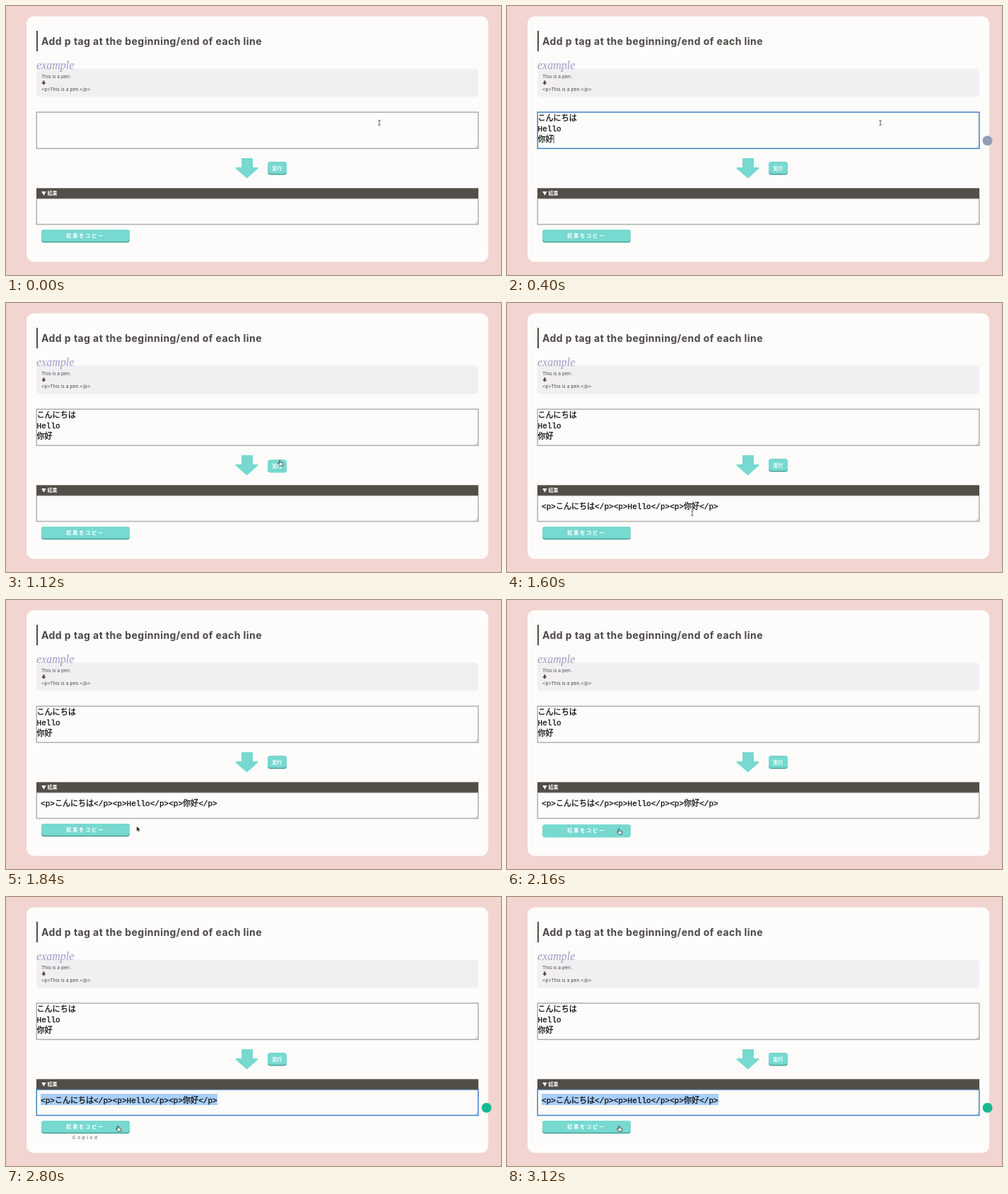
An HTML page for the animation above (3200 ms loop, 700 by 380 pixels).

```html
<!DOCTYPE html>
<html lang="en">
<head>
<meta charset="utf-8">
<title>Tag tool demo</title>
<style>
  html, body { margin: 0; width: 100%; height: 100%; overflow: hidden; background: #f2d4d0; }
  svg { display: block; width: 700px; height: 380px; }
  text { white-space: pre; }
  .ui { font-family: Inter, "Noto Sans CJK JP", "Noto Sans CJK", sans-serif; fill: #4b4845; }
  .title { font-size: 14px; font-weight: 700; letter-spacing: .44px; }
  .small { font-size: 6.7px; }
  .script { font: italic 16px "Liberation Serif", serif; fill: #a297c6; }
  .label { font: 900 7px "Noto Sans CJK JP", "Noto Sans CJK", sans-serif; fill: #fff; }
  .wide { letter-spacing: 2px; }
  .copied { font-size: 6.3px; font-weight: 700; letter-spacing: 2.6px; fill: #68645f; }
  .code { font: 11.05px "Liberation Mono", "Noto Sans CJK JP", "Noto Sans CJK", monospace;
          fill: #111; stroke: #111; stroke-width: .3px; }
  .teal { fill: #77d9d0; }
  .dark { fill: #524e48; }
  .field { fill: none; stroke-width: 1.5px; }
  .grip { fill: none; stroke: #999; stroke-width: .6px; }
</style>
</head>
<body>
<svg viewBox="0 0 700 380">
  <rect width="700" height="380" fill="#f2d4d0"/>
  <rect x="29" y="14.5" width="653" height="347" rx="10" fill="#fdfcfa"/>

  <rect class="dark" x="43" y="35" width="2" height="29"/>
  <text class="ui title" x="50" y="54.5">Add p tag at the beginning/end of each line</text>

  <rect x="43" y="88.5" width="625" height="40" rx="5" fill="#f1eff2"/>
  <text class="script" x="43" y="89">example</text>
  <text class="ui small" x="50" y="101.7">This is a pen.</text>
  <path class="dark" d="M52 105.5h2.6v2.7h2l-3.3 3.3-3.3-3.3h2z"/>
  <text class="ui small" x="50" y="119.8">&lt;p&gt;This is a pen.&lt;/p&gt;</text>

  <rect id="input" class="field" x="43.25" y="150" width="624.5" height="51.3"/>
  <path class="grip" d="M663 201l4-4M665.3 201l1.7-1.7"/>
  <g id="typed" class="code">
    <text x="43.5" y="162.3">こんにちは</text>
    <text x="43.5" y="177">Hello</text>
    <text x="43.5" y="191.7">你好</text>
  </g>
  <rect id="caret" width=".8" height="12" fill="#222"/>

  <path class="teal" d="M334 216h14v13h7.5L340.700 242.300 325.500 229h8.500z"
        stroke="#77d9d0" stroke-width="2" stroke-linejoin="round"/>

  <g id="run">
    <rect class="base" x="370" y="220.3" width="27" height="18.2" rx="4"/>
    <rect class="teal" x="370" y="220.3" width="27" height="16.8" rx="4"/>
    <text class="label" x="376.2" y="231.5">実行</text>
  </g>

  <rect id="selection" x="49" y="278" width="250" height="16" fill="#a9cff8"/>
  <text id="result" class="code" x="49" y="290.6">&lt;p&gt;こんにちは&lt;/p&gt;&lt;p&gt;Hello&lt;/p&gt;&lt;p&gt;你好&lt;/p&gt;</text>
  <rect id="output" class="field" x="43.25" y="272" width="624.5" height="36.5"/>
  <path class="grip" d="M663 308l4-4M665.3 308l1.7-1.7"/>
  <rect class="dark" x="43" y="257.3" width="625" height="14.5"/>
  <path fill="#fff" d="M50.3 262h6.3l-3.15 5.8z"/>
  <text class="label" x="58.5" y="267.4">結果</text>

  <text id="copied" class="ui copied" x="94">Copied</text>
  <g id="copy">
    <rect class="base" x="50" y="316" width="125" height="18.2" rx="4"/>
    <rect class="teal" x="50" y="316" width="125" height="16.8" rx="4"/>
    <text class="label wide" x="85.3" y="327.2">結果をコピー</text>
  </g>

  <circle id="badge" cx="679.5" r="7"/>

  <g id="cursor">
    <path id="ibeam" fill="none" stroke="#333" stroke-width=".8"
          d="M-1.7-3.5Q0-3.500 0-2.2Q0-3.500 1.7-3.500M0-2.2V2.2M-1.7 3.500Q0 3.500 0 2.2Q0 3.500 1.7 3.500"/>
    <path id="hand" fill="#fff" stroke="#222" stroke-width=".8" stroke-linejoin="round"
          d="M-1.5-3.5q.8-.9 1.5 0v2.6l3 .6q1 .3 .9 1.3l-.6 3H-.8L-3.3 1q-.2-1 .8-.7l1 .7z"/>
    <path id="arrow" fill="#111" stroke="#fff" stroke-width=".6"
          d="M0 0v7.5l1.8-1.6 1.2 2.7 1.2-.5-1.2-2.7h2.5z"/>
  </g>
</svg>
<script>
  const LOOP = 3200, STEP = 80;
  const BLUE = "#3f82c8", GREY = "#afafaf";
  const TEAL = "#77d9d0", SHADE = "#459e98";
  const $ = id => document.getElementById(id);
  const show = (id, on) => $(id).setAttribute("visibility", on ? "visible" : "hidden");
  const within = (t, from, to) => t >= from && t < to;
  const ramp = (t, from, to) => Math.min(1, Math.max(0, (t - from) / (to - from)));
  const inside = (p, x0, y0, x1, y1) => within(p.x, x0, x1) && within(p.y, y0, y1);

  // time, x, y
  const path = [
    [640, 528, 165], [960, 388, 226], [1440, 388, 226],
    [1600, 262, 297], [1920, 159, 327]
  ];

  function pointer(t) {
    let [, x, y] = path[0];
    for (let i = 1; i < path.length; i++) {
      const [t0, x0, y0] = path[i - 1], [t1, x1, y1] = path[i];
      if (t < t0) break;
      const k = ramp(t, t0, t1);
      x = x0 + (x1 - x0) * k;
      y = y0 + (y1 - y0) * k;
    }
    return { x, y };
  }

  function press(id, down) {
    $(id).setAttribute("transform", `translate(0 ${down ? 1.2 : 0})`);
    $(id).querySelector(".base").setAttribute("fill", down ? TEAL : SHADE);
  }

  function render(t) {
    const inputFocus = within(t, 80, 1040);
    const outputFocus = t >= 2240;
    $("input").setAttribute("stroke", inputFocus ? BLUE : GREY);
    $("output").setAttribute("stroke", outputFocus ? BLUE : GREY);

    const pasted = t >= 240;
    show("typed", pasted);
    show("caret", inputFocus && t < 720);
    $("caret").setAttribute("x", pasted ? 65.6 : 44.5);
    $("caret").setAttribute("y", pasted ? 182 : 152.5);

    press("run", within(t, 1040, 1200));
    press("copy", within(t, 2080, 2240));
    show("result", t >= 1200);
    show("selection", outputFocus);

    show("copied", outputFocus);
    $("copied").setAttribute("y", 334 + 8 * ramp(t, 2200, 2520));
    $("copied").setAttribute("opacity", Math.min(ramp(t, 2160, 2400), 1 - ramp(t, 2720, 3040)));

    show("badge", within(t, 320, 1040) || t >= 2320);
    $("badge").setAttribute("cy", outputFocus ? 297.7 : 190.2);
    $("badge").setAttribute("fill", within(t, 720, 1040) || t >= 2800 ? "#16b892" : "#919db8");

    const p = pointer(t);
    const onButton = inside(p, 370, 220, 397, 239) || inside(p, 50, 316, 175, 335);
    const onField = inside(p, 43, 150, 668, 202) || inside(p, 43, 272, 668, 309);
    $("cursor").setAttribute("transform", `translate(${p.x} ${p.y})`);
    show("hand", onButton);
    show("ibeam", onField);
    show("arrow", !onButton && !onField);
  }

  const start = performance.now();
  function tick() {
    const t = (performance.now() - start) % LOOP;
    render(Math.floor(t / STEP) * STEP);
    requestAnimationFrame(tick);
  }
  tick();
</script>
</body>
</html>
```
